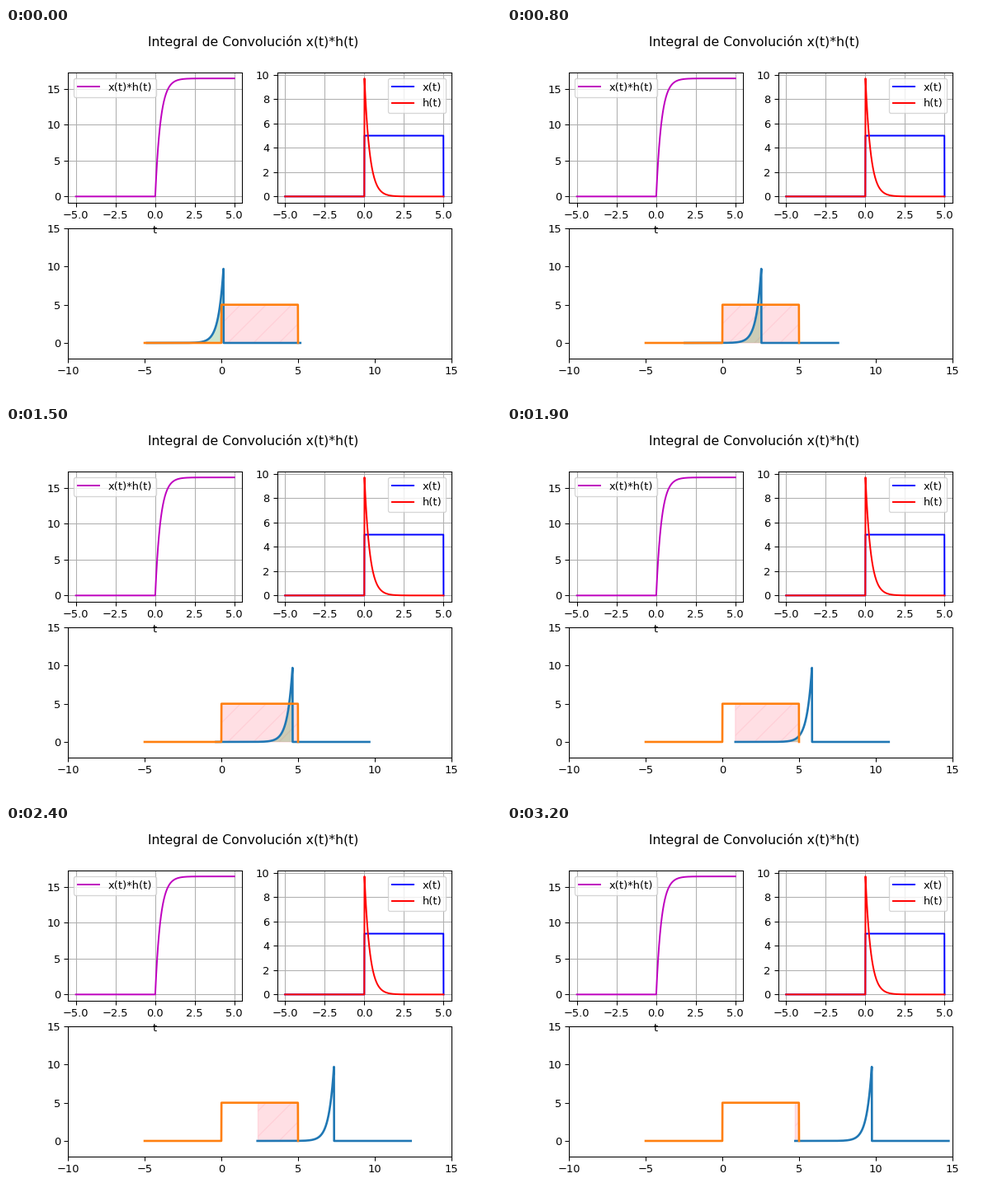
Write a matplotlib script that moves like this. It is 600 by 450 pixels and loops after 3.3 s.

```python
import numpy as np
import matplotlib.pyplot as plt
from matplotlib.animation import FuncAnimation

FRAMES, INTERVAL = 33, 100
DT = 0.01
START, STEP = 0.15, 0.3

plt.rcParams["font.family"] = "DejaVu Sans"


def pulse(t):
    return np.where((t > 0) & (t < 5), 5.0, 0.0)


def decay(t):
    return np.where(t > 0, 10 * np.exp(-3 * np.maximum(t, 0)), 0.0)


def area(t, y):
    """Closed outline between a curve and the baseline."""
    return np.column_stack([np.r_[t[0], t, t[-1]], np.r_[0, y, 0]])


t = np.arange(-500, 501) / 100
x, h = pulse(t), decay(t)
flipped = h[::-1]
conv = np.convolve(x, h)[500:1501] * DT

# 600 x 450 pixels
fig = plt.figure(figsize=(6.4, 4.8), dpi=93.75)
fig.suptitle("Integral de Convolución x(t)*h(t)")
ax = fig.add_subplot(2, 1, 2)
ax_conv = fig.add_subplot(2, 2, 1)
ax_in = fig.add_subplot(2, 2, 2)

ax_conv.plot(t, conv, "m", label="x(t)*h(t)")
ax_conv.set_xlabel("t")
ax_conv.legend(loc="upper left")
ax_conv.grid()

ax_in.plot(t, x, "b", label="x(t)")
ax_in.plot(t, h, "r", label="h(t)")
ax_in.legend(loc="upper right")
ax_in.grid()

moving, = ax.plot([], [], "C0", lw=2)
ax.plot(t, x, "C1", lw=2)
under_x, = ax.fill([0, 0, 0], [0, 0, 0], color="pink", alpha=0.5, hatch="/")
under_h, = ax.fill([0, 0, 0], [0, 0, 0], color="green", alpha=0.2, lw=0)
ax.set_xlim(-10, 15)
ax.set_ylim(-2, 15)


def update(i):
    tau = t + START + STEP * i
    shared = tau <= 5
    moving.set_data(tau, flipped)
    under_x.set_xy(area(tau[shared], pulse(tau[shared])))
    under_h.set_xy(area(tau[shared], flipped[shared]))
    return moving, under_x, under_h


anim = FuncAnimation(fig, update, frames=FRAMES, interval=INTERVAL,
                     repeat=True, repeat_delay=0, blit=False)
plt.show()
```
